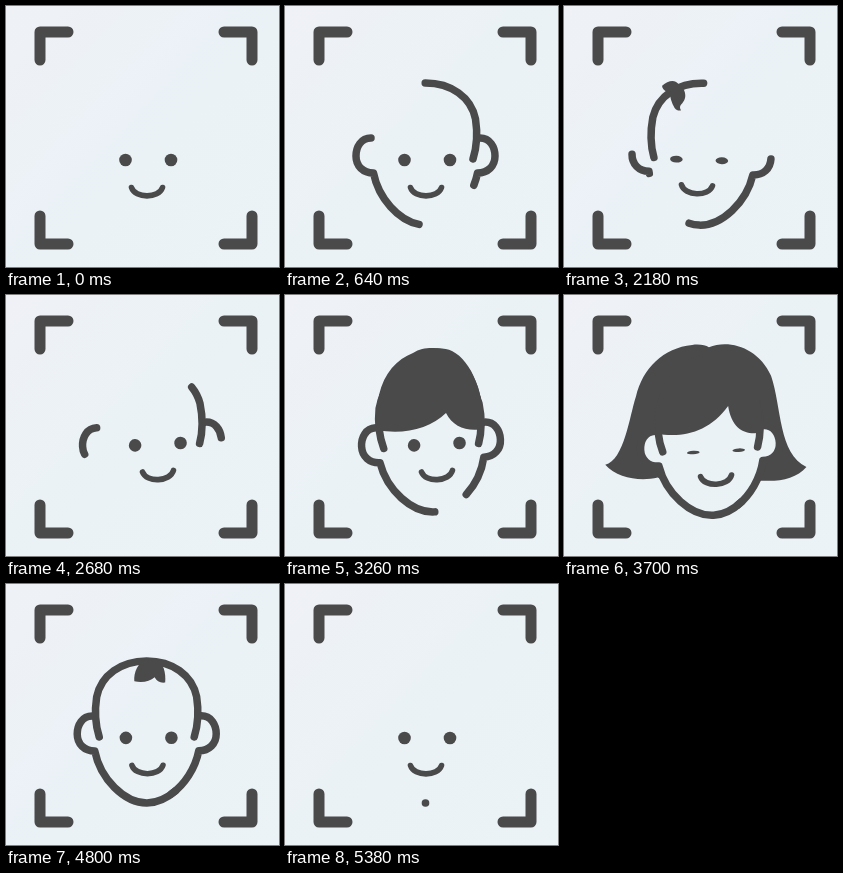
An HTML page for the animation above (5400 ms loop, 273 px wide and 261 px high).

```html
<!DOCTYPE html>
<html lang="en">
<head>
<meta charset="utf-8">
<title>Face scan</title>
<style>
  html, body { margin: 0; width: 100%; height: 100%; overflow: hidden; background: #ecf2f6; }
  svg { display: block; width: 100vw; height: 100vh; }
  .line { fill: none; stroke: #4a4a4a; stroke-linecap: round; stroke-linejoin: round; }
  .ink { fill: #4a4a4a; }
</style>
</head>
<body>
<svg viewBox="0 0 273 261">
  <defs>
    <linearGradient id="bg" gradientUnits="userSpaceOnUse" x1="0" y1="0" x2="273" y2="261">
      <stop offset="0" stop-color="#eff1f6"/>
      <stop offset=".55" stop-color="#eaf2f6"/>
      <stop offset="1" stop-color="#ebf3f7"/>
    </linearGradient>
    <path id="skull" pathLength="100" d="M188 153C191.5 142 192.5 126 190.5 113C186 91 166 77 140.5 77C115 77 95 91 90.5 113C88.5 126 89.5 142 93 153"/>
    <path id="jaw" pathLength="100" d="M86 132C76 132 71 141 71 150C71 160 78 167 88.5 167C94 195 118 219 140.5 219C163 219 187 195 192.5 167C203 167 210 160 210 150C210 141 205 132 195 132"/>
  </defs>
  <rect width="273" height="261" fill="url(#bg)"/>
  <path class="line" stroke-width="11" d="M34 54V26H62M218 26H246V54M34 210V238H62M218 238H246V210"/>
  <g id="head">
    <g transform="rotate(3 140 150) translate(-5.5 2)"><path id="back" class="ink"/></g>
    <g fill="url(#bg)"><use href="#skull"/><use href="#jaw"/></g>
    <g class="line" stroke-width="7.5">
      <use id="arc" href="#skull"/>
      <use id="jawA" href="#jaw"/>
      <use id="jawB" href="#jaw"/>
    </g>
    <g id="eyes" class="ink">
      <ellipse cx="119.5" cy="154" rx="6.3"/>
      <ellipse cx="165" cy="154" rx="6.3"/>
    </g>
    <path id="mouth" class="line" stroke-width="5.6" d="M125.5 181.5C129 192.7 153 192.7 156.5 181.5"/>
    <g transform="rotate(-2 140 150) translate(3 -1)">
      <path id="quiff" class="ink" d="M80 131C73 108 75 80 90 69C97 63 104 62 110 61C120 52 132 50.5 143 51C168 52 184 65 191 83C195 95 201 104 218 102C217 112 209 121 196 124C168 127 140 121 118 113C116 126 104 135 88 134.5C84 134 81 133 80 131Z"/>
    </g>
    <g transform="rotate(3 140 150) translate(-5.5 2)"><path id="fringe" class="ink"/></g>
  </g>
</svg>
<script>
const LOOP = 5400;
const el = {};
for (const node of document.querySelectorAll('[id]')) el[node.id] = node;
const lids = [...el.eyes.children];

const linear = u => u;
const sine = u => (1 - Math.cos(Math.PI * u)) / 2;

// Value at time t of a flat list: time, value, time, value...
function track(keys, ease = sine) {
  return t => {
    if (t <= keys[0]) return keys[1];
    for (let i = 2; i < keys.length; i += 2) {
      if (t < keys[i]) {
        const u = (t - keys[i - 2]) / (keys[i] - keys[i - 2]);
        return keys[i - 1] + (keys[i + 1] - keys[i - 1]) * ease(u);
      }
    }
    return keys[keys.length - 1];
  };
}

const pose = track([640, 0, 1080, -1, 2190, -1, 2540, 1, 4340, 1, 4870, 0]);
const blink = track([960, 0, 1080, 1, 1100, 1, 1260, 0, 1840, 0, 1990, 1, 2090, 1, 2280, 0,
  3560, 0, 3660, 1, 3820, 0, 4340, 0, 4490, 1, 4540, 1, 4740, 0]);
const quiffSize = track([680, 0, 1040, 1.04, 1200, 1, 1900, 1, 2180, .22, 2300, 0]);
const bobSize = track([2950, 0, 3200, 1, 4680, 1, 4870, 0]);
const bobLength = track([3270, 0, 3540, 1.12, 3820, 1, 4530, 1, 4740, 0]);
const sway = track([3340, 0, 3560, -6, 3820, 0]);

const boy = {
  left: track([20, 0, 640, 47.5, 1020, 62], linear),
  right: track([60, 0, 640, 25, 1020, 40], linear),
  arc: track([120, 0, 640, 50, 1020, 100], linear),
  ears: track([1900, 0, 2180, 10, 2400, 21], linear),
  chin: track([1900, 21, 2180, 46, 2460, 79], linear),
  arcCut: track([1900, 0, 2180, 50, 2440, 100], linear)
};
const girl = {
  left: track([2480, 0, 3260, 50, 3440, 62], linear),
  right: track([2480, 0, 3260, 36, 3440, 40], linear),
  arc: track([2500, 0, 3160, 100], linear),
  close: track([4880, 50, 5385, .02]),
  arcCut: track([4880, 0, 5300, 100])
};

function trim(node, from, to) {
  node.style.visibility = to > from ? 'visible' : 'hidden';
  node.style.strokeDasharray = `${Math.max(0, to - from)} 200`;
  node.style.strokeDashoffset = -from;
}

function outline(t) {
  if (t >= 1840 && t < 2480) {
    const e = boy.ears(t);
    trim(el.jawA, e, 21);
    trim(el.jawB, boy.chin(t), 100 - e);
    trim(el.arc, boy.arcCut(t), 100);
  } else if (t >= 4880) {
    const w = girl.close(t);
    trim(el.jawA, 50 - w, 50 + w);
    trim(el.jawB, 0, 0);
    trim(el.arc, girl.arcCut(t), 100);
  } else {
    const who = t < 1840 ? boy : girl;
    trim(el.jawA, 0, who.left(t));
    trim(el.jawB, 100 - who.right(t), 100);
    trim(el.arc, 0, who.arc(t));
  }
}

const shortBob = [93,134, 90,125, 91,112, 94,100, 99,78, 112,64, 128,58, 134,54, 140,53, 147,53,
  166,52, 184,66, 193,92, 197,105, 199,120, 198,134, 194,134, 192,132, 190,130,
  160,125, 130,125, 104,130, 100,134, 96,135, 93,134];
const longBob = [46,165, 64,160, 68,118, 74,98, 80,70, 100,50, 128,47, 136,46, 141,47, 145,49,
  165,41, 194,50, 207,78, 218,108, 216,154, 243,167, 232,180, 212,182, 192,179,
  160,195, 130,195, 97,177, 80,181, 58,178, 46,165];

function bobPath(k, swing) {
  const p = shortBob.map((v, i) => v + (longBob[i] - v) * k);
  for (let i = 0; i < p.length; i += 2) p[i] += swing * (p[i + 1] - 50) / 117;
  const n = p.map(v => v.toFixed(2));
  return `M${n[0]} ${n[1]}C${n.slice(2).join(' ')}Z`;
}

function fringePath(k) {
  return `M92 135C88 105 100 66 137 56C150 52 160 53 167 56C187 66 200 100 198 134` +
    `C182 137 168 132 ${161 + 3 * k} ${118 - 10 * k}C145 134 118 140 92 135Z`;
}

const scaleAt = (x, y, s, turn = 0) =>
  `translate(${x} ${y}) rotate(${turn}) scale(${s}) translate(${-x} ${-y})`;

function show(node, size, x, y, turn) {
  node.style.visibility = size > .005 ? 'visible' : 'hidden';
  node.setAttribute('transform', scaleAt(x, y, size, turn));
}

function draw(t) {
  const p = pose(t), c = blink(t), lift = Math.abs(p);
  const dx = p * (p < 0 ? 3 : 5.5);
  const tilt = p * (p < 0 ? -2 : -3);
  el.head.setAttribute('transform', `translate(${dx} ${4 * c - 2 * lift}) rotate(${tilt} 140 150)`);
  el.eyes.setAttribute('transform', `translate(${4 * p} ${4.5 * c - 2.5 * lift})`);
  el.mouth.setAttribute('transform', `translate(${4 * p} ${1.5 * c - 3 * lift})`);
  for (const lid of lids) lid.setAttribute('ry', 6.3 * (1 - .85 * c));

  outline(t);

  const q = quiffSize(t);
  show(el.quiff, q, 111, 82, 83 * Math.max(0, 1 - q));

  const size = bobSize(t), k = bobLength(t);
  el.back.setAttribute('d', bobPath(k, sway(t)));
  el.fringe.setAttribute('d', fringePath(k));
  show(el.back, size, 147, 80, 0);
  show(el.fringe, size, 147, 80, 0);
}

const start = performance.now();
function tick() {
  draw((performance.now() - start) % LOOP);
  requestAnimationFrame(tick);
}
tick();
</script>
</body>
</html>
```
